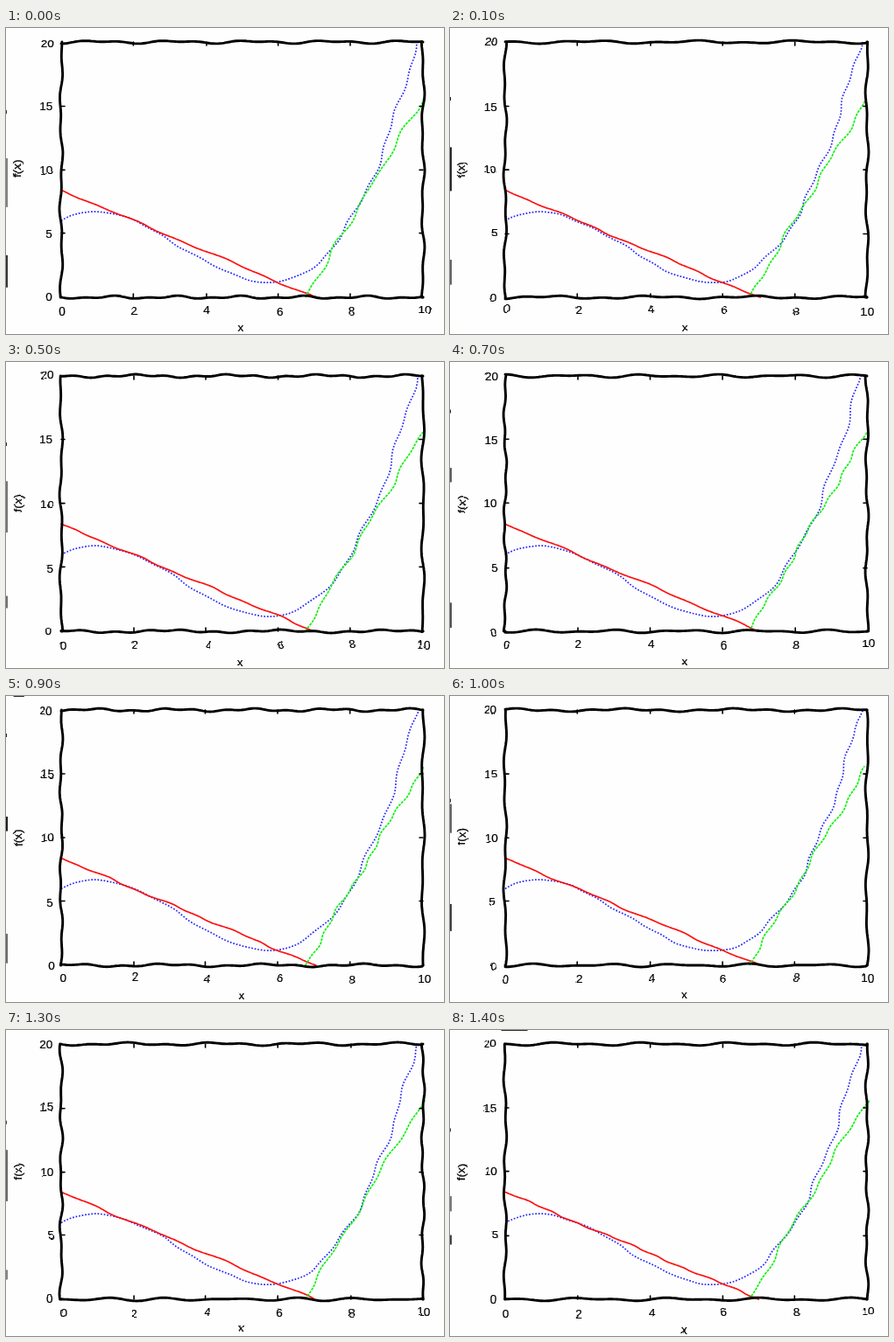
An HTML page that plays this animation: 500 by 350 pixels, repeating every 1.5 s.

```html
<!DOCTYPE html>
<html lang="en">
<head>
<meta charset="utf-8">
<title>Hand-drawn plot</title>
<style>
  html, body { margin: 0; width: 100%; height: 100%; overflow: hidden; background: #fefefe; }
  svg { display: block; width: 500px; height: 350px; }
  path { fill: none; stroke-linejoin: round; stroke-linecap: round; }
  text {
    font: 13.5px "Liberation Sans", Arial, sans-serif;
    fill: #000; stroke: #000; stroke-width: 0.2; text-anchor: middle;
  }
  .step:not(:first-child) { opacity: 0; }
  .box { stroke: #000; stroke-width: 2.9; }
  .tick { stroke: #000; stroke-width: 1.6; }
  .red { stroke: #ff1010; stroke-width: 1.7; }
  .green { stroke: #10f010; stroke-width: 1.7; stroke-dasharray: 3 1.2; stroke-linecap: butt; }
  .blue { stroke: #2424ff; stroke-width: 1.7; stroke-dasharray: 1.7 1.9; stroke-linecap: butt; }
</style>
</head>
<body>
<svg id="stage" viewBox="0 0 500 350"></svg>
<script>
const STEPS = 15, STEP_MS = 100;
const LEFT = 63, RIGHT = 476, TOP = 16, BOTTOM = 308;
const stage = document.getElementById('stage');

// A cubic with its tangents at x = 2 and x = 8
const cubic = x => 0.1 * x ** 3 - x ** 2 + 1.6 * x + 6;
const falling = x => 6 - 1.2 * (x - 2);
const rising = x => 6 + 4.8 * (x - 8);

const px = x => LEFT + (RIGHT - LEFT) * x / 10;
const py = y => BOTTOM - (BOTTOM - TOP) * y / 20;

function randomizer(seed) {
  return () => {
    seed = (seed + 0x6d2b79f5) | 0;
    let t = Math.imul(seed ^ (seed >>> 15), 1 | seed);
    t = (t + Math.imul(t ^ (t >>> 7), 61 | t)) ^ t;
    return ((t ^ (t >>> 14)) >>> 0) / 4294967296;
  };
}

function add(parent, tag, attrs, text) {
  const el = document.createElementNS('http://www.w3.org/2000/svg', tag);
  for (const key in attrs) el.setAttribute(key, attrs[key]);
  if (text) el.textContent = text;
  return parent.appendChild(el);
}

const toPath = pts => 'M' + pts.map(p => p.map(v => v.toFixed(1))).join('L');

// Irregular wave over a travelled distance
function wave(rnd, amp) {
  const part = (min, max) => {
    const k = 2 * Math.PI / (min + rnd() * (max - min)), phase = rnd() * 7;
    return s => Math.sin(s * k + phase);
  };
  const slow = part(70, 130), quick = part(32, 55);
  return s => amp * (0.65 * slow(s) + 0.45 * quick(s));
}

// Straight line that sways sideways
function side(x1, y1, x2, y2, rnd) {
  const len = Math.hypot(x2 - x1, y2 - y1), sway = wave(rnd, 1.8);
  const ux = (x2 - x1) / len, uy = (y2 - y1) / len;
  const pts = [];
  for (let s = 0; s <= len; s += 2) {
    pts.push([x1 + ux * s - uy * sway(s), y1 + uy * s + ux * sway(s)]);
  }
  return toPath([...pts, [x2, y2]]);
}

// Graph shaken along x, so that steep parts show it most
function graph(fn, from, to, rnd) {
  const shake = wave(rnd, 3), pts = [];
  let s = 0;
  for (let i = 0; i <= 200; i++) {
    const x = from + (to - from) * i / 200;
    const p = [px(x), py(fn(x))];
    if (i) s += Math.hypot(p[0] - px(x - (to - from) / 200), p[1] - py(fn(x - (to - from) / 200)));
    pts.push([p[0] + shake(s) * Math.min(1, s / 25), p[1]]);
  }
  return toPath(pts);
}

function drawStep(step) {
  const rnd = randomizer(step * 977 + 41);
  const jitter = amp => (rnd() * 2 - 1) * amp;
  const g = add(stage, 'g', { class: 'step' });
  const path = (cls, d) => add(g, 'path', { class: cls, d });

  path('blue', graph(cubic, 0, 9.83, rnd));
  path('red', graph(falling, 0, 7, rnd));
  path('green', graph(rising, 6.75, 10, rnd));

  for (let x = 2; x < 10; x += 2) {
    path('tick', `M${px(x) + jitter(0.8)},${TOP}v4m0,${BOTTOM - TOP - 4}v-4`);
  }
  for (let y = 5; y < 20; y += 5) {
    path('tick', `M${LEFT},${py(y) + jitter(0.8)}h4m${RIGHT - LEFT - 4},0h-4`);
  }
  path('box', side(LEFT, TOP, RIGHT, TOP, rnd));
  path('box', side(RIGHT, TOP, RIGHT, BOTTOM, rnd));
  path('box', side(LEFT, BOTTOM, RIGHT, BOTTOM, rnd));
  path('box', side(LEFT, TOP, LEFT, BOTTOM, rnd));

  // Lettering, slightly warped
  const id = 'warp' + step;
  const filter = add(g, 'filter', {
    id, filterUnits: 'userSpaceOnUse', x: 0, y: 0, width: 500, height: 350,
    'color-interpolation-filters': 'sRGB'
  });
  add(filter, 'feTurbulence', { type: 'fractalNoise', baseFrequency: 0.05, numOctaves: 1, seed: step + 3 });
  add(filter, 'feDisplacementMap', {
    in: 'SourceGraphic', scale: 4, xChannelSelector: 'R', yChannelSelector: 'G'
  });
  const words = add(g, 'g', { filter: `url(#${id})` });
  const label = (x, y, text, turn = 0) => add(words, 'text', {
    transform: `translate(${x + jitter(1)} ${y + jitter(1.3)}) rotate(${turn})`
  }, text);
  for (let x = 0; x <= 10; x += 2) label(px(x) + 1.5, 327.5, String(x));
  for (let y = 0; y <= 20; y += 5) label(y < 10 ? 50 : 46.5, py(y) + 4.8, String(y));
  label(268, 346.5, 'x');
  label(17.5, 162, 'f(x)', -90);

  // Scraps along the stage edge
  const scrap = (x, y, width, height) => {
    const tone = Math.round(20 + rnd() * 120);
    add(g, 'rect', { x, y, width, height, fill: `rgb(${tone},${tone},${tone})` });
  };
  scrap(0, 70 + rnd() * 140, 2, 15 + rnd() * 45);
  scrap(0, 230 + rnd() * 50, 2, 8 + rnd() * 30);
  scrap(0, 40 + rnd() * 90, 1, 4);
  if (rnd() < 0.3) scrap(rnd() * 65, 0, 10 + rnd() * 30, 1);
  return g;
}

// Every step runs the same loop, shifted by its place in it
const frames = [
  { opacity: 1, easing: 'step-end' },
  { opacity: 0, offset: 1 / STEPS, easing: 'step-end' },
  { opacity: 0 }
];
for (let i = 0; i < STEPS; i++) {
  drawStep(i).animate(frames, {
    duration: STEPS * STEP_MS, delay: (i - STEPS) * STEP_MS, iterations: Infinity
  });
}
</script>
</body>
</html>
```
